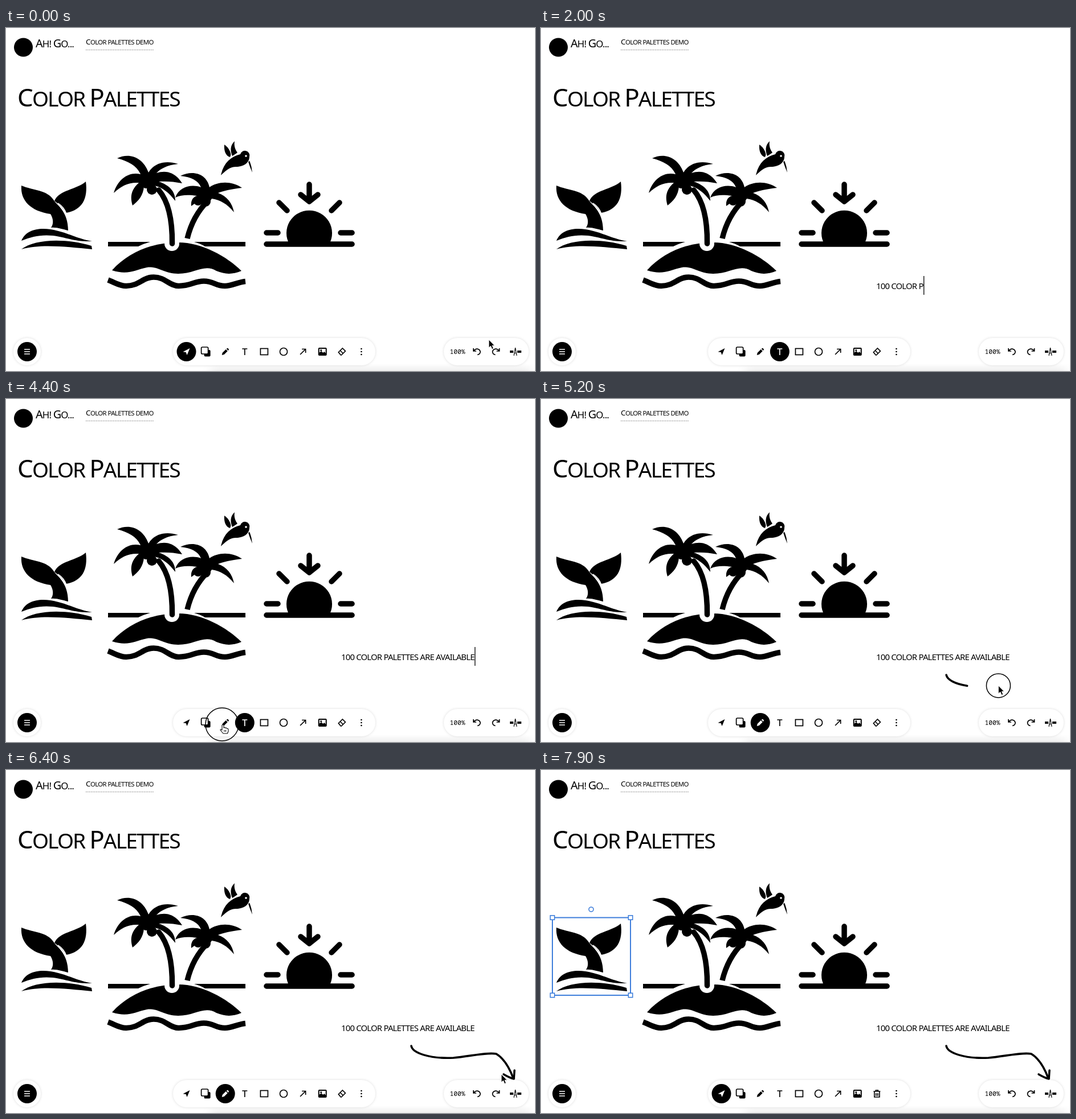
These frames come from a looping animation (928x603 px, 8000 ms). An HTML page:

```html
<!DOCTYPE html>
<html lang="en">
<head>
<meta charset="utf-8">
<title>Color palettes</title>
<style>
  html, body { margin: 0; width: 100%; height: 100%; overflow: hidden; background: #fff; }
  svg { display: block; width: 928px; height: 603px; }
  .hand {
    font: 500 20px "Noto Sans", "Open Sans", sans-serif;
    font-stretch: 62.5%;
    font-variation-settings: "wdth" 62.5;
    letter-spacing: -.05em;
    text-transform: uppercase;
    white-space: pre;
  }
  .hand tspan { font-size: 1.18em; }
  .mono { font: 500 11.3px "Noto Sans Mono", monospace; }
  .pill { fill: #fff; filter: drop-shadow(0 0 2px rgba(0,0,0,.14)); }
  .line { fill: none; stroke: currentColor; stroke-width: 1.7; }
  .ink { fill: none; stroke: #000; stroke-width: 3.6; stroke-linecap: round; stroke-linejoin: round; }
  .bold { stroke-width: 9.5; }
  .tool { color: #000; }
  .tool .disc { visibility: hidden; }
  .tool.on { color: #fff; }
  .tool.on .disc { visibility: visible; }
  .handle { fill: #fff; stroke: #3f7fdb; stroke-width: 1.6; }
</style>
</head>
<body>
<svg viewBox="0 0 928 603">
  <defs>
    <linearGradient id="floor" x2="0" y2="1">
      <stop offset="0" stop-color="#000" stop-opacity="0"/>
      <stop offset="1" stop-color="#000" stop-opacity=".08"/>
    </linearGradient>
    <filter id="soft" x="-10%" width="120%"><feGaussianBlur stdDeviation="9 1"/></filter>
  </defs>

  <g id="header">
    <circle cx="30.5" cy="34" r="16.5"/>
    <text class="hand" x="52" y="28" dy=".36em" data-width="67"><tspan>A</tspan>h! <tspan>G</tspan>o...</text>
    <text class="hand" x="140" y="25" dy=".36em" data-width="119"><tspan>C</tspan>olor palettes demo</text>
    <path d="M140 38.5H259" stroke="#777" stroke-dasharray="1.5"/>
    <text class="hand" x="20" y="125" dy=".36em" data-width="285"><tspan>C</tspan>olor <tspan>P</tspan>alettes</text>
  </g>

  <g id="whale">
    <path d="M27 277C48 286 72 284 84 303C89 311 109 322 109 356C99 354 90 350 79 351C84 344 83 335 78 327C44 322 25 304 27 277Z"/>
    <path d="M140 270C144 300 134 320 105 325C101 317 95 312 85 304C92 285 124 284 140 270Z"/>
    <path d="M91 308Q102 315 106 327" fill="none" stroke="#fff" stroke-width="1.6"/>
    <path d="M27 374C36 352 64 349 92 357C112 362 125 370 151 375C120 376 106 368 82 365C60 363 45 367 27 374Z"/>
    <path d="M27 389C50 371 104 369 150 383L151 389C108 385 62 379 27 389Z"/>
  </g>

  <g id="island">
    <path d="M179 376H253Q242 379 232 384H179ZM330 376H420V384H349Q341 379 330 376Z"/>
    <path d="M186 426C215 394 256 377 302 377C344 377 388 402 413 427C396 434 384 433 369 427C348 414 332 432 302 432C277 432 266 418 247 421C227 425 214 435 186 426Z"/>
    <path class="ink bold" style="stroke-linecap: butt" d="M179 443C190 447 199 453.5 211 453.5C233 453.5 240 438 259 438C280 438 285 453 303 453.5C325 453.5 330 445 347 445C365 445 367 453.5 384 453.5C397 453 406 447 420 445.5"/>
    <path d="M291 366V379" class="ink" style="stroke: #fff; stroke-width: 26"/>
    <path class="ink bold" d="M268 285C285 305 292 338 291.5 379"/>
    <path class="ink bold" style="stroke-linecap: butt" d="M354 304C336 322 324 345 318 370"/>
    <!-- left crown -->
    <path d="M195 229C215 219 240 226 250 254C260 237 280 232 302 239C282 241 270 248 264 255C285 248 300 258 309 273C295 270 280 269 268 270C288 277 297 288 297 304C286 290 275 280 260 277L242 278C241 295 232 304 222 312C217 296 220 284 233 272C214 271 202 278 189 290C196 266 215 252 236 257C230 243 215 234 195 229Z"/>
    <circle cx="256" cy="284" r="9"/><circle cx="246" cy="274" r="8"/>
    <!-- right crown -->
    <path d="M306 260C328 249 352 256 357 280C371 270 395 268 414 281C396 283 382 286 372 290C388 296 397 308 400 324C388 309 375 302 361 300L355 309L336 305L325 313C324 303 328 297 335 295C320 293 308 293 297 298C304 279 325 274 342 280C337 268 325 262 306 260Z"/>
    <circle cx="337" cy="304" r="8"/><circle cx="350" cy="305" r="9"/>
  </g>

  <g id="bird">
    <path d="M411 222C394 226 381 238 377 259C387 249 394 244 403 244C417 244 427 237 427 226A8 8 0 0 0 411 222Z"/>
    <path d="M383 205C382 217 386 225 393 227Q396 222 392 215Q389 209 383 205ZM401 199C392 207 394 218 397 225Q402 222 406 219C401 212 400 206 401 199ZM425 235L427.5 234Q431 243 432 254Q428 245 425 235Z"/>
    <circle cx="421" cy="225" r="1.8" fill="#fff"/>
  </g>

  <g id="sun">
    <path d="M497 380A40 40 0 1 1 567 380Z"/>
    <path class="ink bold" d="M457 380H607M457 360H477M587 360H607M479 307L493 321M585 307L571 321M532 275V304M517 293L532 305L547 293"/>
  </g>

  <text class="hand" id="label" x="588" y="454" dy=".36em" data-width="234">100 color palettes are available</text>
  <path id="caret" d="M0 436V469" stroke="#000" stroke-width="1.3"/>
  <path id="curve" class="ink" pathLength="1" d="M711 485C713 498 745 508 785 506C815 503 845 496 860 499C875 508 884 526 890 542"/>
  <path id="barbs" class="ink" pathLength="1" d="M892 528L891 543Q883 541 873 535"/>

  <g id="selection">
    <rect x="20" y="259.5" width="137" height="136.5" fill="none" stroke="#3f7fdb" stroke-width="2"/>
    <circle class="handle" cx="88" cy="245" r="4"/>
  </g>

  <rect x="360" y="590" width="560" height="16" fill="url(#floor)" filter="url(#soft)"/>
  <rect class="pill" x="13" y="545" width="48" height="48" rx="24"/>
  <circle cx="37" cy="569" r="17"/>
  <path d="M32 565H42M32 569H42M32 573H42" stroke="#fff" stroke-width="1.6"/>
  <rect class="pill" x="293" y="545" width="355" height="48" rx="24"/>
  <g id="tools"></g>

  <rect class="pill" x="768" y="545" width="149" height="48" rx="24"/>
  <text class="mono" x="778.5" y="573">100%</text>
  <path id="undo" class="line" d="M820 563V568H825M820.5 567.5C825 562 831 564 832 569C832 572 830 574 827 574.5"/>
  <use href="#undo" transform="matrix(-1 0 0 1 1685.5 0)"/>
  <path d="M884 567H890V571H884ZM897 567H904V571H897Z"/>
  <path class="line" d="M891 576L893.5 562L896 576M892 571.500H895" style="stroke-width: 1.2"/>

  <circle id="ring" fill="none" stroke="#000" stroke-width="1.5"/>
  <g id="pointer">
    <path id="arrow" d="M0 0V14L3.3 11L5.7 16.5L8.2 15.4L5.9 10.2H10Z" stroke="#fff" stroke-width=".8"/>
    <path id="finger" transform="translate(-3 0)" fill="#fff" stroke="#000" stroke-width="1.1" stroke-linejoin="round"
      d="M3 10V1.5Q4.5-.5 6 1.5V6Q7.5 4.5 9 6.5Q10.5 5.5 12 7.5Q14 7 14 9V12L12.5 16H5L0 10Q0 7.5 3 10ZM7 10V13M9.5 10V13"/>
  </g>
</svg>

<script>
const LOOP = 8000, STEP = 100, INK_LAG = 120, RING = 21;
const TYPE_START = 1000, CHARS_PER_MS = .0113;
const $ = id => document.getElementById(id);
const show = (id, on) => { $(id).style.display = on ? '' : 'none'; };
const clamp = v => Math.min(1, Math.max(0, v));

const icons = {
  select: '<path fill="currentColor" d="M-6 .2L6-6L1 6L-.8 1Z"/>',
  swatch: '<rect x="-3" y="-3" width="11" height="11.5" rx="2"/><rect class="line" x="-8" y="-8" width="12" height="12" rx="2" style="fill: #fff"/>',
  pencil: '<path fill="currentColor" d="M-6 6L-5 2L1-4L4-1L-2 5ZM2-5L4-6.5L6.5-4L5-2Z"/>',
  text: '<path class="line" d="M-4.5-5H4.5M0-5V6"/>',
  rect: '<rect class="line" x="-6.5" y="-5.5" width="13" height="11"/>',
  oval: '<circle class="line" r="6.5"/>',
  line: '<path class="line" d="M-5 5L4-4M-2-4.5H4.5V2"/>',
  image: '<rect class="line" x="-6.5" y="-6" width="13" height="12" rx="1" style="stroke-width: 2"/><path d="M-6 5V2L-2-1L1 2L3 0L6 3V5Z"/><circle cx="-2.5" cy="-2.5" r="1.5"/>',
  erase: '<path id="eraser" class="line" d="M-6 1L1-6L6-1L-1 6H-2ZM-3-2L2 3"/><path id="trash" class="line" d="M-6-4H6M-2-4V-6H2V-4M-4.5-4V6H4.5V-4M-1.5-1V4M1.5-1V4"/>',
  more: '<path fill="none" stroke="currentColor" stroke-width="2.6" stroke-linecap="round" d="M0-5V-5M0 0V0M0 5V5"/>'
};
$('tools').innerHTML = Object.entries(icons).map(([name, art], i) =>
  `<g class="tool" id="${name}" transform="translate(${316.5 + i * 34.1} 569)"><circle class="disc" r="17"/>${art}</g>`
).join('');

for (const x of [20, 157]) for (const y of [259.5, 396]) {
  $('selection').innerHTML += `<rect class="handle" x="${x - 3.7}" y="${y - 3.7}" width="7.4" height="7.4"/>`;
}

// Size each heading from the natural proportions of its typeface.
for (const el of document.querySelectorAll('[data-width]')) {
  el.style.fontSize = 20 * el.dataset.width / el.getComputedTextLength() + 'px';
}

const message = $('label').textContent;

// Pointer stops: time, x, y.
const stops = [
  [0, 847, 548], [400, 419, 566], [800, 588, 452],
  [3800, 600, 455], [4000, 366, 548], [4300, 379, 572], [4600, 379, 572], [5000, 711, 482],
  [6400, 869, 535], [6700, 316, 567], [6900, 316, 567], [7200, 100, 312], [7600, 100, 312], [7900, 700, 540]
];
const strokes = [
  { id: 'curve', from: 5000, time: 800, until: 6000, lag: INK_LAG, ease: u => 1 - (1 - u) ** 2.2 },
  { id: 'barbs', from: 6000, time: 300, until: 6400, lag: 0, ease: u => u }
];
const taps = [4300, 6800, 7300];

function stopAt(t) {
  const i = stops.findIndex(stop => stop[0] > t);
  if (i < 0) return { x: stops.at(-1)[1], y: stops.at(-1)[2] };
  const [t0, x0, y0] = stops[i - 1], [t1, x1, y1] = stops[i];
  const u = (t - t0) / (t1 - t0);
  return { x: x0 + (x1 - x0) * u, y: y0 + (y1 - y0) * u };
}

const progress = (stroke, t) => stroke.ease(clamp((t - stroke.from) / stroke.time));

function drawInk(t) {
  for (const stroke of strokes) {
    const done = progress(stroke, t - stroke.lag);
    show(stroke.id, done > 0);
    $(stroke.id).setAttribute('stroke-dasharray', `${done} 2`);
  }
}

function drawPointer(t) {
  const stroke = strokes.find(s => t >= s.from && t < s.until);
  const tap = taps.find(at => t >= at && t <= at + 200);
  const path = stroke && $(stroke.id);
  const { x, y } = path ? path.getPointAtLength(path.getTotalLength() * progress(stroke, t)) : stopAt(t);

  const overTools = y > 552 && x > 293 && x < 648;
  show('pointer', t < 800 || (t >= 3900 && t < 7900));
  show('finger', overTools);
  show('arrow', !overTools);
  $('pointer').setAttribute('transform', `translate(${x} ${y})`);

  // The ring holds while drawing and spreads after a tap.
  const ring = $('ring');
  show('ring', stroke || tap);
  ring.setAttribute('r', RING + (tap ? (t - tap) * .08 : 0));
  ring.setAttribute('transform', `translate(${x} ${y})`);
}

function drawLabel(t) {
  const label = $('label');
  label.textContent = message.slice(0, Math.max(0, Math.floor((t - TYPE_START) * CHARS_PER_MS)));
  show('caret', t >= 800 && t < 4500);
  $('caret').setAttribute('transform', `translate(${589 + label.getComputedTextLength()} 0)`);
}

function render(t) {
  const tool = t < 500 || t >= 7000 ? 'select' : t < 4500 ? 'text' : 'pencil';
  document.querySelectorAll('.tool').forEach(el => el.classList.toggle('on', el.id === tool));

  const selected = t >= 7400;
  show('selection', selected);
  show('trash', selected);
  show('eraser', !selected);

  drawLabel(t);
  drawInk(t);
  drawPointer(t);
}

const start = performance.now();
function tick() {
  render(Math.floor((performance.now() - start) % LOOP / STEP) * STEP);
  requestAnimationFrame(tick);
}
tick();
</script>
</body>
</html>
```
